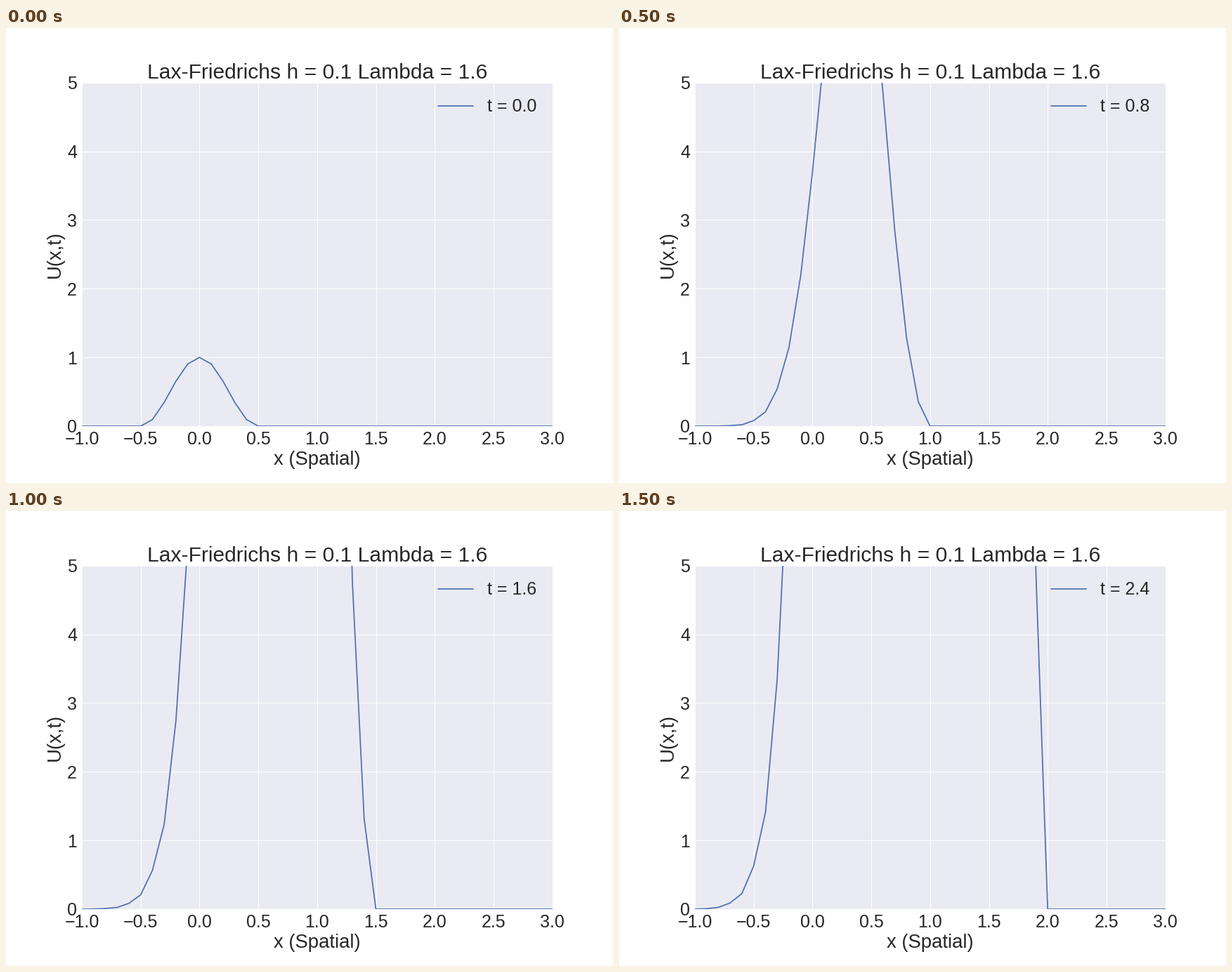
A matplotlib script that plays this animation: 864x648 px, repeating every 1.6 s.

```python
import numpy as np
import matplotlib.pyplot as plt
from matplotlib.animation import FuncAnimation

H, LAM = 0.1, 1.6
STEPS = 16
INK = "#262626"

plt.rcParams.update({
    "font.family": "Liberation Sans",
    "text.color": INK,
    "axes.labelcolor": INK,
    "xtick.color": INK,
    "ytick.color": INK,
    "axes.facecolor": "#EAEAF2",
    "axes.axisbelow": True,
    "axes.unicode_minus": True,
    "axes.labelpad": 4,
    "axes.titlepad": 6,
    "lines.solid_capstyle": "round",
})


def solve():
    """All time levels of the scheme, with zero values at both ends."""
    x = np.linspace(-1, 3, 41)
    u = np.where(np.abs(x) < 0.499, np.cos(np.pi * x) ** 2, 0.0)
    levels = [u]
    for _ in range(STEPS - 1):
        new = np.zeros_like(u)
        new[1:-1] = (1 + LAM) / 2 * u[:-2] + (LAM - 1) / 2 * u[2:]
        u = new
        levels.append(u)
    return x, levels


x, levels = solve()

fig = plt.figure(figsize=(12, 9), dpi=72, facecolor="white")
fig.subplots_adjust(left=0.125, right=0.9, bottom=0.125, top=0.88)
ax = fig.add_subplot()
ax.set(xlim=(-1, 3), ylim=(0, 5))
ax.set_xticks(np.arange(-1, 3.1, 0.5))
ax.set_yticks(range(6))
ax.grid(color="white", linewidth=1, linestyle="-")
ax.tick_params(length=0, pad=7, labelsize=25)
for spine in ax.spines.values():
    spine.set_visible(False)

ax.set_title(f"Lax-Friedrichs h = {H} Lambda = {LAM}", fontsize=30)
ax.set_xlabel("x (Spatial)", fontsize=27.5)
ax.set_ylabel("U(x,t)", fontsize=27.5)

line, = ax.plot(x, levels[0], color="#4C72B0", linewidth=1.75, label="t = 0.0")
legend = ax.legend(loc="upper right", frameon=False, fontsize=25)
label = legend.get_texts()[0]


def update(n):
    line.set_ydata(levels[n])
    label.set_text(f"t = {round(n * H * LAM, 2)}")
    return line, label


anim = FuncAnimation(fig, update, frames=STEPS, interval=100,
                     repeat=True, repeat_delay=0, blit=False)
plt.show()
```
